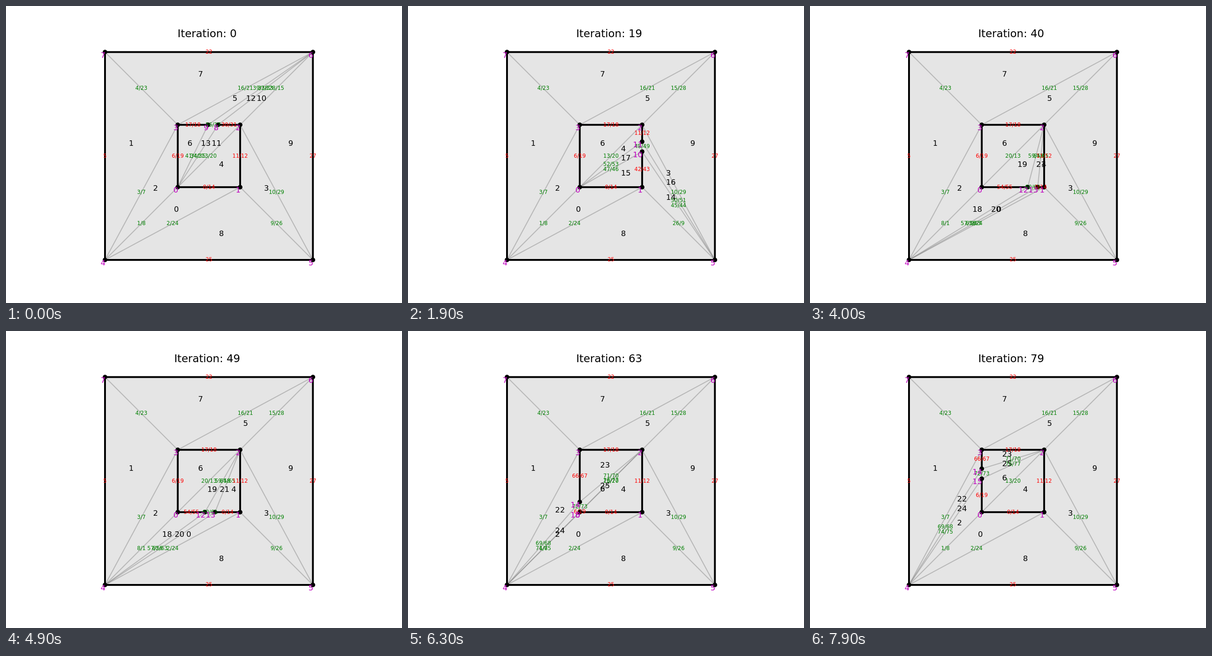
An HTML page that plays this animation: 864x648 px, repeating every 8 s.

```html
<!DOCTYPE html>
<html lang="en">
<head>
<meta charset="utf-8">
<title>Mesh with a moving door</title>
<style>
  html, body { margin: 0; width: 100%; height: 100%; overflow: hidden; background: #fff; }
  svg { display: block; width: 864px; height: 648px; font-family: "DejaVu Sans", sans-serif; }
  .inner { stroke: #808080; stroke-opacity: .45; stroke-width: 2.1; }
  .wall { stroke: #000; stroke-width: 4; stroke-linecap: square; }
  .edge { font-size: 11.67px; text-anchor: middle; }
  .red { fill: #f00; }
  .green { fill: #008000; }
  .face { font-size: 16.67px; }
  .vertex { font-size: 16.67px; text-anchor: end; fill: #bf00bf; }
  .title { font-size: 23.33px; text-anchor: middle; }
</style>
</head>
<body>
<svg id="stage" viewBox="0 0 864 648"></svg>
<script>
const LEFT = 216, BOTTOM = 554.04, SIZE = 453.6;
const STEP_MS = 100, STEPS = 80;
const STEP = 0.01, DOOR = 0.048, WALL = 0.3;

// Unit coordinates, y upwards: inner square, then outer square.
const corners = [
  [.35, .35], [.65, .35], [.65, .65], [.35, .65],
  [0, 0], [1, 0], [1, 1], [0, 1]
].map(([x, y]) => [LEFT + x * SIZE, BOTTOM - y * SIZE]);

const outerWalls = [[4, 5, "25"], [5, 6, "27"], [6, 7, "22"], [7, 4, "5"]];
const innerWalls = [[0, 1, "0/14"], [1, 2, "11/12"], [2, 3, "17/18"], [3, 0, "6/19"]];
const diagonals = [
  [7, 3, "4/23"], [3, 6, "16/21"], [2, 6, "15/28"], [2, 5, "10/29"], [1, 5, "9/26"],
  [1, 4, "2/24"], [0, 4, "1/8"], [3, 4, "3/7"], [0, 2, "13/20"]
];
const faces = {
  0: [0, 1, 4], 1: [3, 4, 7], 2: [0, 3, 4], 3: [1, 2, 5], 4: [0, 1, 2],
  5: [2, 3, 6], 6: [0, 2, 3], 7: [3, 6, 7], 8: [1, 4, 5], 9: [2, 5, 6]
};

// The door slides along one wall per phase. Each wall end, door side and apex
// (out, in) spans extra triangles; out/in list face ids from wall start to end.
const phases = [
  { from: 0, offset: .146, wall: 2, lead: 8, apex: [6, 0], out: [5, 12, 10], in: [6, 13, 11],
    labels: ["30/31", "32/33", "34/35", "36/37", "39/38", "41/40"], flipped: ["15/28"] },
  { from: 11, offset: .001, wall: 1, lead: 10, apex: [5, 0], out: [3, 16, 14], in: [4, 17, 15],
    labels: ["42/43", "45/44", "47/46", "48/49", "50/51", "52/53"], flipped: ["9/26"] },
  { from: 37, offset: .001, wall: 0, lead: 12, apex: [4, 2], out: [0, 20, 18], in: [4, 21, 19],
    labels: ["54/55", "57/56", "59/58", "60/61", "62/63", "64/65"], flipped: ["1/8", "13/20"] },
  { from: 63, offset: .001, wall: 3, lead: 14, apex: [4, 2], out: [2, 24, 22], in: [6, 25, 23],
    labels: ["66/67", "69/68", "71/70", "72/73", "74/75", "76/77"], flipped: [] }
];

const mix = (p, q, t) => p.map((v, i) => v + (q[i] - v) * t);
const text = (cls, x, y, s) =>
  `<text class="${cls}" x="${x.toFixed(2)}" y="${y.toFixed(2)}">${s}</text>`;

function buildMesh(n) {
  const ph = phases.filter(p => p.from <= n).pop();
  const { lead, labels, apex: [out, inn] } = ph;
  const trail = lead + 1;
  const [end, start, wallLabel] = innerWalls[ph.wall];
  const pos = ph.offset + (n - ph.from) * STEP;

  const pts = { ...corners };
  pts[trail] = mix(corners[start], corners[end], pos / WALL);
  pts[lead] = mix(corners[start], corners[end], (pos + DOOR) / WALL);

  const walls = [
    ...outerWalls,
    ...innerWalls.filter((w, i) => i !== ph.wall),
    [start, trail, wallLabel],
    [lead, end, labels[0]]
  ];
  const inner = [
    ...diagonals.map(([a, b, s]) =>
      [a, b, ph.flipped.includes(s) ? s.split("/").reverse().join("/") : s]),
    [out, lead, labels[1]], [inn, lead, labels[2]], [trail, lead, labels[3]],
    [out, trail, labels[4]], [inn, trail, labels[5]]
  ];

  const tris = { ...faces };
  const spans = [[start, trail], [trail, lead], [lead, end]];
  spans.forEach((span, i) => {
    tris[ph.out[i]] = [...span, out];
    tris[ph.in[i]] = [...span, inn];
  });
  return { pts, walls, inner, tris };
}

function render(n) {
  const { pts, walls, inner, tris } = buildMesh(n);
  const line = cls => ([a, b]) =>
    `<line class="${cls}" x1="${pts[a][0]}" y1="${pts[a][1]}" x2="${pts[b][0]}" y2="${pts[b][1]}"/>`;
  const edgeLabel = color => ([a, b, s]) => {
    const [x, y] = mix(pts[a], pts[b], .5);
    return text("edge " + color, x, y + 3.4, s);
  };
  const dot = ([x, y]) => `<circle cx="${x}" cy="${y}" r="5"/>`;
  const faceLabel = ([id, tri]) => {
    const [x, y] = [0, 1].map(k => tri.reduce((sum, v) => sum + pts[v][k], 0) / 3);
    return text("face", x - .8, y + .6, id);
  };
  const vertexLabel = ([id, [x, y]]) => text("vertex", x + 1, y + 12.2, id);

  return [
    `<rect x="${LEFT}" y="${BOTTOM - SIZE}" width="${SIZE}" height="${SIZE}" fill="#e5e5e5"/>`,
    ...inner.map(line("inner")),
    ...walls.map(line("wall")),
    ...Object.values(pts).map(dot),
    ...Object.entries(tris).map(faceLabel),
    ...inner.map(edgeLabel("green")),
    ...walls.map(edgeLabel("red")),
    ...Object.entries(pts).map(vertexLabel),
    text("title", 438.9, 67.7, "Iteration: " + n)
  ].join("");
}

const stage = document.getElementById("stage");
const t0 = performance.now();
let shown = -1;

function tick() {
  const n = Math.floor((performance.now() - t0) / STEP_MS) % STEPS;
  if (n !== shown) {
    stage.innerHTML = render(n);
    shown = n;
  }
  requestAnimationFrame(tick);
}
tick();
</script>
</body>
</html>
```
